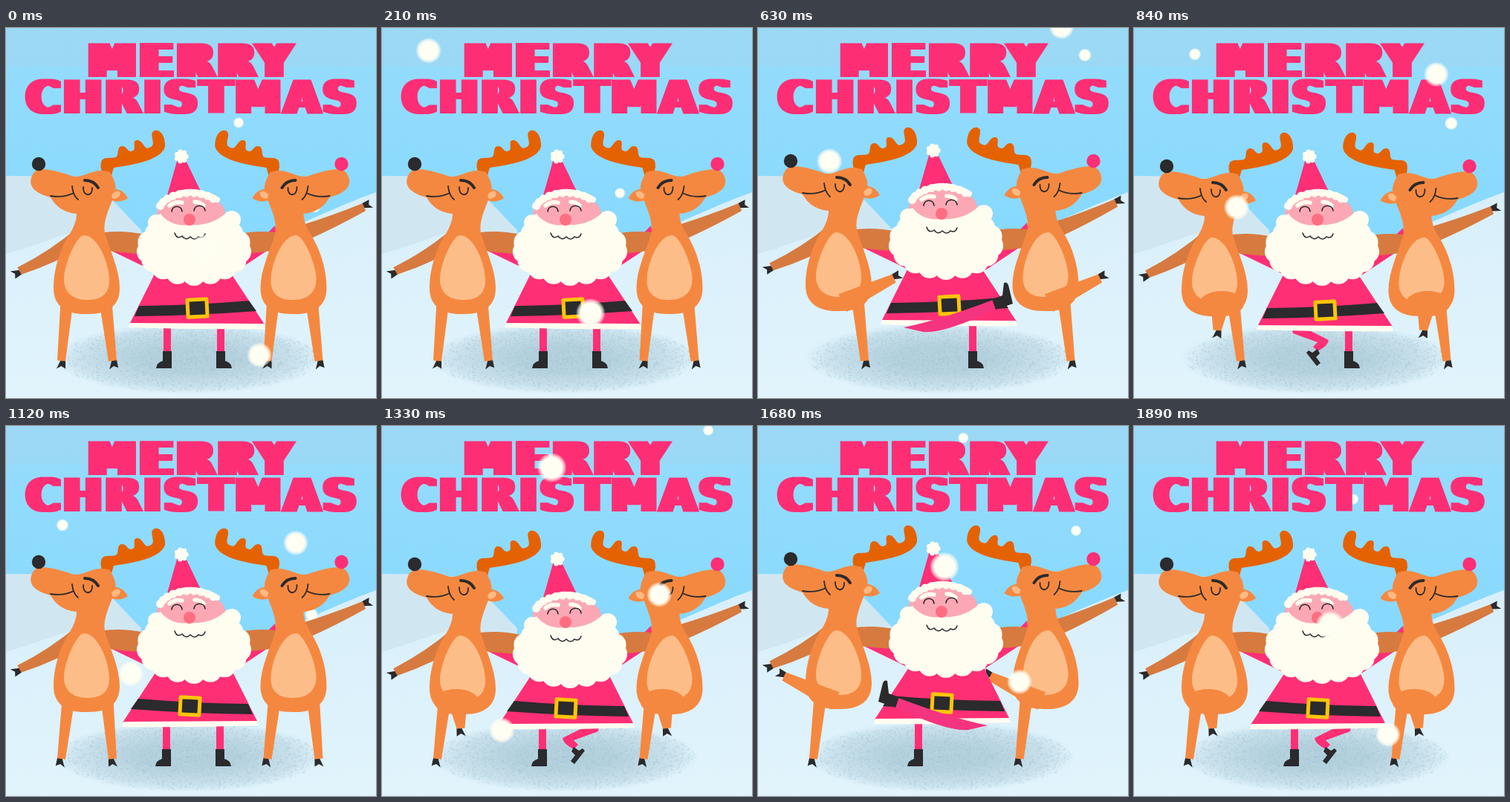
Write an HTML page that moves like this. It is 498 by 498 pixels and loops after 1960 ms.

```html
<!DOCTYPE html>
<html lang="en">
<head>
<meta charset="utf-8">
<title>Merry Christmas</title>
<style>
  html, body { margin: 0; width: 100%; height: 100%; overflow: hidden; background: #8cdbff; }
  svg { display: block; width: 100vw; height: 100vh; }
  text { font: bold 62px "DejaVu Sans", sans-serif; fill: #fe2f75; }
</style>
</head>
<body>
<svg viewBox="0 0 498 498">
  <defs>
    <linearGradient id="sky" x2="0" y2="1">
      <stop offset="0" stop-color="#97dcfb"/><stop offset="1" stop-color="#86d9ff"/>
    </linearGradient>
    <linearGradient id="snow" x2="0" y2="1">
      <stop offset="0" stop-color="#d8effa"/><stop offset="1" stop-color="#e1f4fc"/>
    </linearGradient>
    <radialGradient id="shade">
      <stop offset=".35" stop-color="#a9c8d6" stop-opacity=".8"/>
      <stop offset=".8" stop-color="#a9c8d6" stop-opacity=".42"/>
      <stop offset="1" stop-color="#a9c8d6" stop-opacity="0"/>
    </radialGradient>
    <radialGradient id="puff">
      <stop offset=".68" stop-color="#fffef2"/>
      <stop offset=".85" stop-color="#fffef2" stop-opacity=".6"/>
      <stop offset="1" stop-color="#fffef2" stop-opacity="0"/>
    </radialGradient>
    <filter id="fat"><feMorphology operator="dilate" radius="5 0"/></filter>
    <filter id="fatter"><feMorphology operator="dilate" radius="7 0"/></filter>
  </defs>
  <rect width="498" height="290" fill="url(#sky)"/>
  <rect width="498" height="51" fill="#a0d8f0" opacity=".55"/>
  <path d="M0 199Q60 199 100 203C130 212 150 240 182 272V310H0Z" fill="#d0e7f2"/>
  <path d="M0 304C40 293 70 279 100 273L250 300L320 296C380 272 440 242 498 221V498H0Z" fill="url(#snow)"/>
  <ellipse cx="245" cy="445" rx="182" ry="48" fill="url(#shade)"/>
  <path id="grain" stroke="#9dbdcc" stroke-width="1.3" opacity=".5"/>
  <g id="far"></g>
  <text x="112" y="66" letter-spacing="7.6" filter="url(#fatter)">MERRY</text>
  <text x="27.500" y="115" letter-spacing="4.3" filter="url(#fat)">CHRISTMAS</text>
  <g id="cast"></g>
  <g id="near"></g>
</svg>
<script>
const LOOP = 1960, STEP = 245;
const PINK = '#fe2f75', FUR = '#f58840', ARM = '#d77a3f', INK = '#2b2a2c', WHITE = '#fffdf0';
const BODY_DY = [0, 3, -4, 3], HEAD_DY = [0, 6, -8, 0];
const $ = id => document.getElementById(id);

const fill = (d, color) => `<path d="${d}" fill="${color}"/>`;
const line = (d, width = 1.8, color = INK) =>
  `<path d="${d}" fill="none" stroke="${color}" stroke-width="${width}" stroke-linecap="round"/>`;
const ball = (x, y, r, color) => `<circle cx="${x}" cy="${y}" r="${r}" fill="${color}"/>`;
const oval = (x, y, rx, ry, color) => `<ellipse cx="${x}" cy="${y}" rx="${rx}" ry="${ry}" fill="${color}"/>`;
const group = (transform, content) => `<g transform="${transform}">${content}</g>`;
const flip = (sum, content) => group(`translate(${sum} 0) scale(-1 1)`, content);
const lift = (dy, content) => group(`translate(0 ${dy})`, content);

// Tapered, optionally bowed limb that ends in a split hoof
function limb(x1, y1, x2, y2, w1, w2, color, bow = 0) {
  const len = Math.hypot(x2 - x1, y2 - y1), mid = (w1 + w2) / 2;
  const angle = Math.atan2(y2 - y1, x2 - x1) * 180 / Math.PI;
  return group(`translate(${x1} ${y1}) rotate(${angle})`,
    fill(`M${len - 1} ${-w2}l11 -1l-3 6l4 6l-12 ${w2 - 10}Z`, INK) +
    fill(`M0 ${-w1}Q${len / 2} ${bow - mid} ${len} ${-w2}V${w2}Q${len / 2} ${bow + mid} 0 ${w1}Z`, color));
}

const hug = fill('M125 276Q155 271 186 278V304Q155 303 125 298Z', ARM);

function deerTop(noseColor) {
  return fill('M129 178C134 173 140 176 148 174C153 171 148 160 156 159C164 159 163 169 171 165' +
      'C176 163 169 152 176 151C185 150 185 165 193 161C205 158 190 142 200 138' +
      'C210 136 215 150 214 160C209 176 180 183 145 188L142 198H131Q125 186 129 178Z', '#e56203') +
    fill('M36 197C42 186 62 190 88 199C104 204 118 186 140 194C146 205 150 213 146 224' +
      'C139 243 130 260 133 276C140 300 153 325 153 350C153 372 140 385 110 385' +
      'C78 386 64 372 64 350C64 325 72 300 84 280C92 268 95 258 95 250' +
      'C75 248 66 238 60 228C38 222 28 212 36 197Z', FUR) +
    fill('M139 217Q156 214 164 229Q154 236 142 232Z', FUR) +
    fill('M142 225Q149 216 154 222Q153 230 144 230Z', '#ffb983') +
    ball(44, 183, 9.2, noseColor) +
    line('M60 226Q78 229 91 222M89 213Q90 225 97 231') +
    line('M104 214C103 227 117 228 116 215') +
    line('M106 205Q118 205 124 215', 4) +
    fill('M105 279C95 279 78 318 78 338C78 358 92 366 110 366' +
      'C128 366 139 358 139 340C139 318 124 279 105 279Z', '#fdbd89');
}

function deerLegs(k, dy) {
  const left = limb(82, 368 + dy, 74.5, 448, 8.5, 5.5, FUR);
  const right = limb(134, 368 + dy, 143.5, 448, 8.5, 5.5, FUR);
  if (k === 0) return left + right;
  if (k === 2) return right + limb(114, 370, 183, 337, 13, 6, FUR);
  return right + oval(118, 371, 30, 17, FUR) + limb(115, 380, 112, 407, 11, 5.5, FUR);
}

function deer(k, half, mirrored) {
  const dy = BODY_DY[k], swing = dy * .4;
  const side = s => mirrored ? flip(495.5, s) : s;
  const reach = mirrored
    ? limb(400, 276, 482, 241 + swing, 11, 5.5, ARM, 2)
    : limb(104, 279, 18, 327 + swing, 13, 5.5, ARM, -6);
  const legs = deerLegs(k, dy);
  return lift(dy, side(hug) + reach + side(deerTop(mirrored ? PINK : INK))) +
    group(`translate(${mirrored ? 277.5 : 0} 0)`, half ? flip(218, legs) : legs);
}

const sleeves = fill('M136 297L200 298V328Z', PINK) + fill('M362 266L366 290L306 330L296 300L330 298Z', PINK);

function santaLower(k) {
  const stand = fill('M212 396H222V437H212Z', PINK) + fill('M211 435H223V458H202Q203 450 211 448Z', INK);
  const bent = fill('M212 400L232 405L262 420Q261 428 247 435L241 429L247 423L214 411Z', PINK) +
    fill('M247 432L240 437L235 434L232 437L246 455L251 451L245 443L250 438Z', INK);
  const kick = fill('M196 403Q245 393 316 366L321 378Q250 412 222 409Z', '#f5347f') +
    fill('M315 365L329 360L331 343Q335 341 337 346L343 371L320 379Z', INK);
  const robe = fill('M203 325L167 397Q258 404 348 399L296 320Z', PINK) +
    fill('M167 397L347 398L349 405Q255 406 165 403Z', WHITE) +
    fill('M179 374Q258 373 327 367L337 381Q258 387 173 388Z', INK) +
    `<rect x="244.500" y="365.500" width="26" height="23" fill="${INK}" stroke="#fdc50a" stroke-width="5" stroke-linejoin="round" transform="rotate(-3 257 377)"/>`;
  const lifted = [stand, bent, '', bent][k];
  return flip(506, stand) + lifted + lift(BODY_DY[k], robe) + (k === 2 ? kick : '');
}

function santaHead() {
  let beard = oval(253, 300, 62, 35, WHITE) + ball(304, 258, 12, WHITE) + ball(202, 262, 11, WHITE) +
    fill('M196 256L208 250Q222 268 247 265Q278 267 298 247L312 258V292H196Z', WHITE);
  for (let i = 0; i < 13; i++) {
    const a = (-35 + i * 250 / 12) * Math.PI / 180;
    beard += ball(253 + 62 * Math.cos(a), 297 + 34.5 * Math.sin(a), 15.5, WHITE);
  }
  let brim = line('M208 237Q243 208 284 231', 8, WHITE), pompom = ball(236, 173, 7.5, WHITE);
  for (let i = 0; i < 10; i++) {
    const a = (196 + i * 13.5) * Math.PI / 180;
    brim += ball(248 + 42 * Math.cos(a), 246 + 24 * Math.sin(a), 5.5, WHITE);
  }
  for (let i = 0; i < 7; i++) {
    const a = i * Math.PI * 2 / 7;
    pompom += ball(236 + 6.5 * Math.cos(a), 173 + 6.5 * Math.sin(a), 3.2, WHITE);
  }
  return fill('M231 176L215 232L266 228L241 176Z', PINK) +
    oval(249, 249, 46, 25, '#fba8b4') + brim + pompom + beard +
    line('M220 239Q227 233 237 235M254 234Q262 234 266 239', 5.5, WHITE) +
    line('M223 247C224 238 236 238 237 247M253 246C254 237 267 237 268 246', 1.6) +
    ball(247, 258, 8, '#ff6d80') +
    line('M227 276Q230 285 237 280Q242 287 248 281Q254 287 259 281Q266 284 268 277', 1.5);
}

function drawCast(pose) {
  const k = pose % 4, half = pose >> 2, lower = santaLower(k);
  return lift(BODY_DY[k], sleeves) + deer(k, half, false) + deer(k, half, true) +
    (half ? flip(505, lower) : lower) + lift(HEAD_DY[k], santaHead());
}

// Falling snow: radius, then [ms, x, y] stops
const NEAR = [
  [17.5, [80, 52, -20], [350, 74, 84], [630, 96, 179], [840, 138, 241], [1120, 168, 333], [1470, 157, 460], [1620, 150, 518]],
  [17, [570, 409, -20], [840, 407, 62], [1120, 390, 157], [1470, 362, 273], [1890, 342, 415], [2180, 338, 518]],
  [20, [1130, 215, -22], [1470, 238, 110], [1890, 264, 268], [2310, 289, 441], [2500, 296, 520]]
];
const FAR = [
  [9, [510, 448, -12], [630, 440, 36], [840, 427, 128], [1120, 411, 253], [1400, 400, 372]],
  [8.5, [710, 84, -12], [840, 82, 35], [1120, 76, 133], [1470, 72, 290], [1750, 82, 365]],
  [7.5, [1290, 440, -12], [1470, 436, 66], [1890, 420, 215], [2240, 400, 345]],
  [7.5, [1610, 270, -12], [1890, 295, 98], [1960, 313, 127], [2310, 325, 285], [2590, 365, 370]]
];

function flakeAt([r, ...stops], t) {
  if (t < stops[0][0]) t += LOOP;
  const i = stops.findIndex(s => s[0] > t);
  if (i < 1) return '';
  const [t0, x0, y0] = stops[i - 1], [t1, x1, y1] = stops[i];
  const p = (t - t0) / (t1 - t0);
  return ball(x0 + (x1 - x0) * p, y0 + (y1 - y0) * p, r, 'url(#puff)');
}

let seed = 7;
const rnd = () => (seed = seed * 16807 % 2147483647) / 2147483647;
let dots = '';
for (let i = 0; i < 1800; i++) {
  const a = rnd() * Math.PI * 2, d = Math.pow(rnd(), .6);
  dots += `M${(245 + 176 * d * Math.cos(a)).toFixed(1)} ${(446 + 44 * d * Math.sin(a)).toFixed(1)}h1.3`;
}
$('grain').setAttribute('d', dots);

let shown = -1;
function draw(now) {
  const t = now % LOOP, pose = Math.floor(t / STEP);
  if (pose !== shown) $('cast').innerHTML = drawCast(shown = pose);
  $('far').innerHTML = FAR.map(f => flakeAt(f, t)).join('');
  $('near').innerHTML = NEAR.map(f => flakeAt(f, t)).join('');
}

const start = performance.now();
function tick() {
  draw(performance.now() - start);
  requestAnimationFrame(tick);
}
tick();
</script>
</body>
</html>
```
